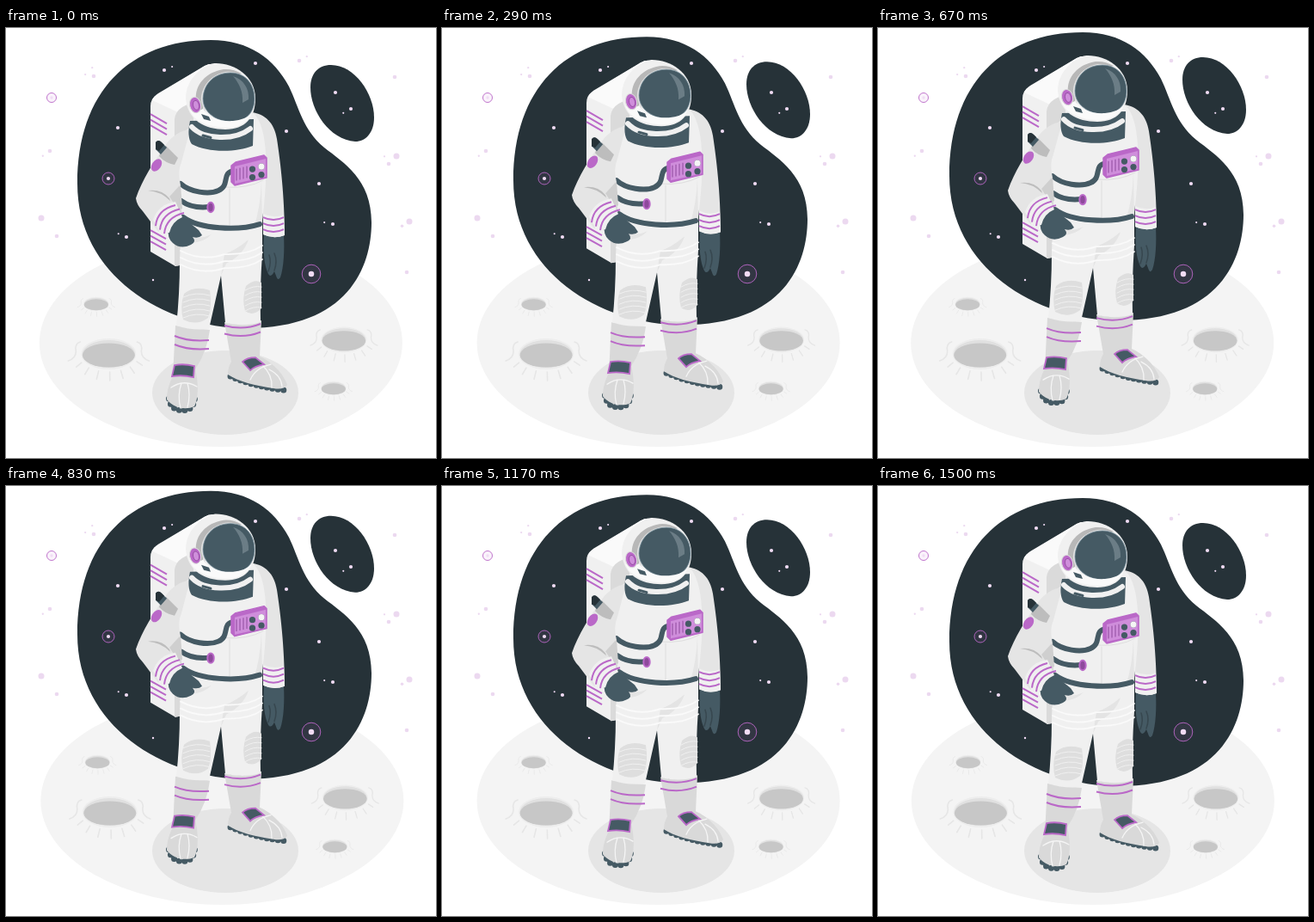
Recreate the animation shown at these times as an HTML page. Size 500x500 px, loop 1.54 s.

```html
<!DOCTYPE html>
<html lang="en">
<head>
<meta charset="utf-8">
<title>Astronaut on the moon</title>
<style>
html, body { margin: 0; width: 100%; height: 100%; overflow: hidden; background: #fff; }
svg { display: block; width: 100%; height: 100%; }
.line { fill: none; stroke-linecap: round; }
.p { fill: #ba68c8; }
.ps { stroke: #ba68c8; stroke-width: 2; fill: none; }
.d { fill: #455a64; }
.ds { stroke: #455a64; fill: none; stroke-linecap: round; }
.tread { stroke-width: 7; stroke-dasharray: 0 6.4; }
.strap { fill: #455a64; stroke: #ba68c8; stroke-width: 1.8; }
.seam { stroke: #f5f5f5; stroke-width: 1.3; }
.white { fill: #f0f0f0; }
.grey { fill: #e5e5e5; }
.boot { fill: #d9d9d9; }
</style>
</head>
<body>
<svg viewBox="0 0 500 500">
  <g id="moon">
    <ellipse cx="250" cy="366" rx="211" ry="121" fill="#f4f4f4"/>
    <g id="craters"></g>
  </g>
  <ellipse cx="255" cy="424" rx="85" ry="49" fill="#e5e5e5"/>

  <g class="float" fill="#263238">
    <path d="M238 14C283 14 312 36 329 68C341 93 345 118 370 139C393 157 425 176 425 226C425 278 398 349 280 349C183 349 83 287 83 181C83 74 144 14 238 14Z"/>
    <path d="M378 43C405 43 428 76 428 104C428 122 418 132 406 132C376 130 354 96 354 69C354 53 363 43 378 43Z"/>
  </g>

  <g id="stars"></g>

  <g class="float">
    <!-- backpack -->
    <path class="white" d="M168 91Q168 82 175 78L231 44Q242 38 252 47L226 120L202 276L197 277L168 260Z"/>
    <path d="M170 84Q172 79 177 76L231 44Q242 38 252 47L216 88L200 98Z" fill="#fafafa"/>
    <path d="M196 106Q197 97 205 92L218 85V274L202 276L196 277Z" fill="#dadada"/>
    <path class="ps" data-n="3" data-step="0 6.5" d="M168 100L187 111"/>
    <path class="ps" data-n="3" data-step="0 6.5" d="M168 235L186 245"/>

    <!-- left boot -->
    <path class="ds tread" d="M189.500 431Q192 446 208 444.500Q218 444 219.500 430"/>
    <path class="boot" d="M197 346L237 351Q234 376 220 397C224 412 224 431 219 440C208 445 194 441 187 432C187 424 189 414 194 405Z"/>
    <path class="line seam" d="M192 418Q207 408 222 417M204 413Q199 427 203 442M211 413Q215 426 211 441"/>
    <path class="strap" d="M196 392Q207 390 219 393L218 406Q205 403 193 405Z"/>
    <path class="ps" data-n="2" data-step="0 10" d="M196 358Q212 365 236 363"/>

    <!-- right boot -->
    <path class="ds tread" d="M261 405Q288 417 323 421"/>
    <path class="boot" d="M254 342Q277 348 297 340L295 382C309 388 323 402 327 415Q323 421 311 419C290 416 270 411 258 403Q258 395 262 388Z"/>
    <path class="line seam" d="M284 409Q290 395 308 391M298 392Q310 403 309 418M306 397Q320 404 321 417"/>
    <path class="strap" d="M275 388Q280 383 290 383L300 391Q289 393 284 398Z"/>

    <!-- legs -->
    <path class="white" d="M204 222L298 228L298 262Q295 305 296 342Q278 348 255 343L250 288L236 350Q216 352 198 346Q202 310 202 270Z"/>
    <path class="ps" data-n="2" data-step="0 9.500" d="M254 346Q276 352 296 344"/>
    <path d="M254 263Q268 258 282 246Q276 264 256 274L250 288ZM205 234Q220 249 239 240Q226 253 205 249Z" fill="#e4e4e4"/>
    <path d="M207 309Q219 299 237 305Q240 325 235 337Q222 347 206 339Q202 324 207 309ZM279 300Q289 291 297 296V326Q287 336 278 329Q274 315 279 300Z" fill="#dedede"/>
    <path class="line" data-n="5" data-step="0 6" stroke="#f0f0f0" d="M206 313Q221 306 237 311M278 305Q288 299 297 301"/>
    <path class="line" data-n="3" data-step="0 8" stroke="#fafafa" stroke-width="1.800" d="M203 259Q228 272 254 263Q282 264 298 253"/>

    <!-- right arm -->
    <path class="d" d="M300 240L323 241C324 258 323 279 319 290Q316 295 314 288L312 283Q308 291 305 286Q298 272 300 240Z"/>
    <path class="line" d="M312 282Q316 271 312 262M305 283Q309 272 306 264" stroke="#37474f" stroke-width="1.500"/>
    <path class="grey" d="M286 98C301 100 312 110 315 129C319 155 324 195 324 241Q311 246 299 240L298 150Z"/>
    <path class="white" d="M299 216Q311 222 323 217L324 241Q311 246 299 240Z"/>
    <path class="ps" data-n="3" data-step="0 7" d="M299 220Q311 226 323 220"/>

    <!-- torso -->
    <path class="white" d="M213 116L288 99Q300 111 302 146Q304 180 297 231Q250 244 205 222Q200 170 198 145Q202 124 213 116Z"/>
    <path class="line" d="M260 187V234M299 177Q281 187 254 185" stroke="#dedede"/>
    <path class="grey" d="M297 178L298 229L288 233Q296 208 297 178Z"/>
    <g class="ds" stroke-width="6">
      <path d="M206 220C225 234 270 236 295 228"/>
      <path d="M203 181C214 191 236 194 247 189C261 183 250 168 265 166"/>
      <path d="M204 201Q216 210 236 208"/>
    </g>
    <ellipse cx="238" cy="208.500" rx="3.700" ry="5.700" fill="#8e4a9c" stroke="#ba68c8" stroke-width="2"/>

    <!-- chest panel -->
    <path class="p" d="M262 160L267 156L300 148L303 151V174L266 183L262 179Z" stroke="#ba68c8" stroke-width="1.500" stroke-linejoin="round"/>
    <path d="M266 161L302 152V173L266 181Z" fill="#cf8edb"/>
    <path class="line" data-n="4" data-step="4 -1" stroke="#8e4a9c" d="M268 164V177"/>
    <circle class="d" data-n="2" data-step="10.500 -3" cx="286.500" cy="164" r="3.600"/>
    <circle class="d" data-n="2" data-step="10.500 -3" cx="286.500" cy="173.500" r="3.600"/>
    <circle cx="297" cy="161" r="3.600" fill="#f5f5f5"/>

    <!-- left arm -->
    <path class="d" d="M189 232Q192 222 203 218L209 222Q216 229 224 235L228 241Q224 245 217 243Q222 249 215 252Q203 258 194 250Q187 244 189 232Z"/>
    <path class="grey" d="M214 118C203 119 192 126 185 137C172 155 158 177 151 198Q152 206 159 213L177 237L204 219L190 196L203 183Q199 167 204 156Z"/>
    <path d="M165 189Q181 187 190 198L191 201Q180 190 165 189Z" fill="#bdbdbd"/>
    <path d="M190 196L203 182L205 210L200 212Z" fill="#cfcfcf"/>
    <path class="white" d="M171 223Q177 205 197 202L205 220Q193 225 190 238L180 239Z"/>
    <path class="ps" data-n="3" data-step="5 4.500" d="M174 230Q176 211 197 206"/>
    <path d="M181 141L186 137L200 151L196 159Q185 157 178 149Z" fill="#bdbdbd"/>
    <path class="d" d="M174 133Q177 129 181 133L187 139L180 147L174 141Z"/>
    <path d="M174 133Q177 129 181 133L184 136L178 143L174 141Z" fill="#263238"/>
    <ellipse class="p" cx="175" cy="159.500" rx="5.200" ry="8" transform="rotate(35 175 159.500)"/>

    <!-- collar -->
    <path class="d" d="M214 108Q210 127 216 135C234 145 267 145 287 137L288 106Z"/>
    <path class="line" stroke="#f0f0f0" stroke-width="6" d="M216 115C230 130 266 131 284 117"/>
    <path class="ds" stroke-width="3" d="M229 125L238 127.500"/>

    <!-- helmet -->
    <path class="white" d="M209 82C209 61 225 46 242 41C264 40 290 55 290 82C290 104 278 118 255 118C231 118 211 107 209 82Z"/>
    <path d="M221 84C219 66 233 51 253 48Q264 47 274 53L236 64L228 98Z" fill="#b8b8b8"/>
    <path d="M227 85C226 68 239 54 255 51Q265 50 274 55L240 64L231 99Z" fill="#e2e2e2"/>
    <path class="d" d="M229 82C230 63 244 52 261 52C279 52 289 66 289 82C289 97 280 109 263 109C250 110 229 101 229 82Z" stroke="#78909c" stroke-width=".8"/>
    <path d="M264 56C276 60 283 70 282 83L275 87C276 74 271 64 264 56Z" fill="#6b7d86"/>
    <path d="M213 94Q221 99 229 94C235 104 249 109 264 108Q278 107 286 99Q280 113 262 116C238 117 218 109 213 94Z" fill="#fafafa"/>
    <path class="d" d="M227 100L236 103L238 108L230 106Z"/>
    <g transform="rotate(-12 220 89)">
      <ellipse class="p" cx="220" cy="89.500" rx="6.500" ry="9.300" stroke="#dadada"/>
      <ellipse cx="220.800" cy="90" rx="3.400" ry="5.600" fill="#cf8edb" stroke="#8e4a9c" stroke-width=".8"/>
    </g>
  </g>
</svg>
<script>
const $ = id => document.getElementById(id);

// Repeat an element data-n times, each shifted by data-step
document.querySelectorAll('[data-n]').forEach(el => {
  const [dx, dy] = el.dataset.step.split(' ');
  for (let i = el.dataset.n - 1; i > 0; i--) {
    const copy = el.cloneNode();
    copy.setAttribute('transform', `translate(${dx * i} ${dy * i})`);
    el.after(copy);
  }
});

// Short rays fan out below the rim, with one long fold on each side
let rays = '';
for (let a = 25; a <= 155; a += 21) {
  const c = Math.cos(a * Math.PI / 180), s = Math.sin(a * Math.PI / 180);
  rays += `M${36 * c} ${21 * s}L${43 * c} ${31 * s}`;
}
const fold = 'M33-14Q40-12 38-3Q38 5 47 8';
const crater = (x, y, s) => `<g transform="translate(${x} ${y}) scale(${s})">
  <g class="line" stroke="#e6e6e6" stroke-width="1.6">
    <path d="${rays}"/><path d="${fold}"/><path d="${fold}" transform="scale(-1 1)"/></g>
  <ellipse rx="32" ry="18" fill="#ededed"/>
  <ellipse rx="30.500" ry="16" fill="#e0e0e0"/>
  <ellipse cy="1.500" rx="30.500" ry="14" fill="#c7c7c7"/></g>`;
$('craters').innerHTML = crater(119.5, 379, 1) + crater(105, 321, .46) + crater(393, 362.5, .83) + crater(381, 419, .46);

// A star, with small companions 10 px away at the given angles
const dot = (x, y, r, fill) => `<circle cx="${x}" cy="${y}" r="${r}" fill="${fill}"/>`;
const star = (fill, size) => ([x, y, ...angles]) => dot(x, y, size, fill) + angles.map(a => {
  const t = a * Math.PI / 180;
  return dot(x + 10 * Math.cos(t), y + 10 * Math.sin(t), size / 2, fill);
}).join('');
const ring = (x, y, r) => `<circle cx="${x}" cy="${y}" r="${r}" fill="#ba68c8" fill-opacity=".08" stroke="#ba68c8" stroke-width=".9"/>`
  + dot(x, y, r * .3, '#f1dcf5');

const bright = [[184, 49, -24], [290, 41], [130, 116], [326, 120], [364, 181], [380, 228, 191],
  [140, 243, 202], [383, 75], [401, 94, 151]];
const pale = [[102, 56, 191, 260], [341, 38, -29], [51, 143, 145], [452, 57], [445, 158, 240], [466, 284], [59, 242]];
const large = [[454, 149], [469, 225, 148], [41, 221]];
$('stars').innerHTML = [
  ...pale.map(star('#ecd9f0', 2.3)), ...large.map(star('#ecd9f0', 3.5)), ...bright.map(star('#f1dcf5', 2.1)),
  dot(171, 293, 1.2, '#f1dcf5'), ring(53, 81, 5.5), ring(119, 175, 7), ring(355, 286, 10.8)
].join('');

const LOOP = 1540, PERIOD = 1500, LEAD = 20;
const floats = document.querySelectorAll('.float');

// Alternating shake that grows to 4 px and fades the same way
function shake(step) {
  const k = Math.min(step, 10 - step);
  return k > 0 ? (-1) ** k * Math.min(4, 2 ** (k - 1)) : 0;
}

function draw(ms) {
  const p = (Math.min(ms % LOOP, PERIOD) + LEAD) % PERIOD / PERIOD;
  const lift = 10 * (1 - Math.abs(2 * p - 1));
  const i = Math.floor(p * 10);
  const sway = shake(i) + (shake(i + 1) - shake(i)) * (p * 10 - i);
  floats.forEach(g => g.setAttribute('transform', `translate(0 ${(0.3 - lift).toFixed(3)})`));
  $('moon').setAttribute('transform', `translate(${sway.toFixed(3)} 0)`);
}

let start;
function tick(now) {
  start ??= now;
  draw(now - start);
  requestAnimationFrame(tick);
}
draw(0);
requestAnimationFrame(tick);
</script>
</body>
</html>
```
